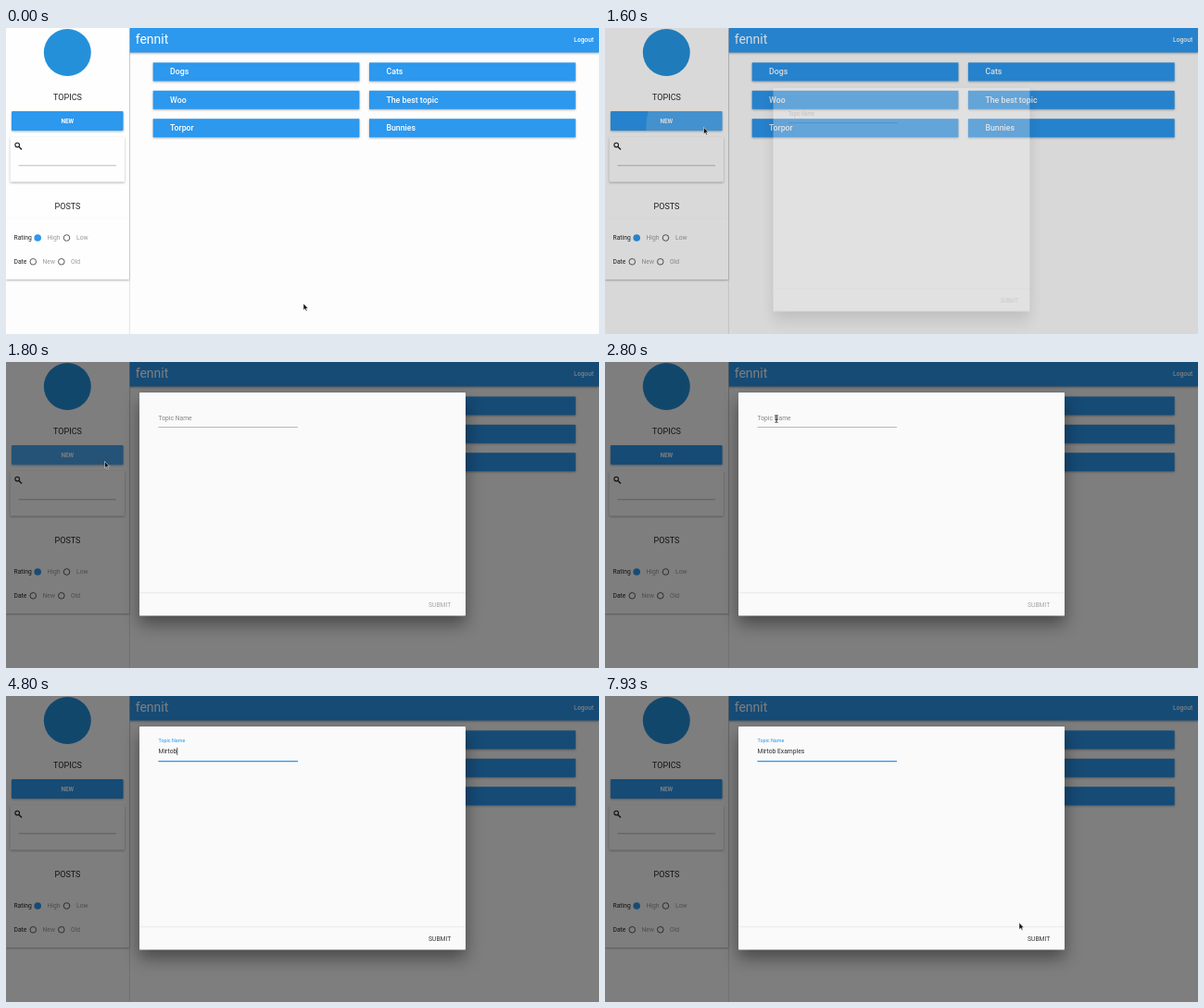
Recreate the animation shown at these times as an HTML page. Size 640 by 331 pixels, loop 8000 ms.

```html
<!DOCTYPE html>
<html lang="en">
<head>
<meta charset="utf-8">
<title>New topic dialog</title>
<style>
  html, body { margin: 0; width: 100%; height: 100%; overflow: hidden; background: #fdfdfd; }
  svg { display: block; width: 100vw; height: 100vh; font: 6.75px Roboto, sans-serif; }
  text { white-space: pre; }
  .blue { fill: #2c98ee; }
  .raised { filter: drop-shadow(0 1px 1.1px rgba(0, 0, 0, .3)); }
  .heading { font-size: 9px; text-anchor: middle; fill: #222; }
  .topic { font-size: 8.8px; font-weight: 500; fill: #fff; }
  .dark { fill: #222; }
  .muted { fill: #9a9a9a; }
  .radio { fill: none; stroke: #5a5a5a; stroke-width: 1; }
  .sheet { fill: #fafafa; filter: drop-shadow(0 9px 9px rgba(0, 0, 0, .42)); }
</style>
</head>
<body>
<svg viewBox="0 0 640 331" preserveAspectRatio="none">
  <defs>
    <clipPath id="buttonClip"><rect x="6" y="90" width="120.5" height="21" rx="1"/></clipPath>
  </defs>

  <rect width="640" height="331" fill="#fdfdfd"/>
  <rect class="blue raised" x="133" width="507" height="26.5"/>
  <text x="139.7" y="17.3" font-size="14" fill="#fff">fennit</text>
  <text x="613" y="15" font-weight="500" fill="#fff">Logout</text>
  <g id="topics"></g>

  <rect width="133" height="331" fill="#fdfdfd"/>
  <path d="M133.4 0V331" stroke="#dcdcdc" stroke-width=".8"/>
  <rect class="raised" width="133" height="272" fill="#fefefe"/>
  <circle cx="66.3" cy="26.5" r="25.5" fill="#2590da"/>
  <text class="heading" x="66.5" y="77.8">TOPICS</text>
  <rect class="blue raised" x="6" y="90" width="120.5" height="21" rx="1"/>
  <text x="66.3" y="102.9" font-size="6.4" font-weight="700" text-anchor="middle" fill="#fff">NEW</text>
  <g clip-path="url(#buttonClip)"><circle id="ripple" cx="106.5" cy="108" fill="#fff"/></g>

  <rect class="raised" x="4.5" y="118" width="123.5" height="48.5" rx="1" fill="#fefefe"/>
  <g fill="none" stroke="#222">
    <circle cx="12.2" cy="126.6" r="2.3" stroke-width="1.1"/>
    <path d="M14 128.4L17 131.4" stroke-width="1.4"/>
  </g>
  <path d="M13.5 148.8H119" stroke="#9e9e9e" stroke-width=".7"/>
  <text class="heading" x="66.5" y="196.2">POSTS</text>
  <path d="M0 206H133" stroke="#f3f3f3" stroke-width=".6"/>

  <text class="dark" x="8.5" y="229.2">Rating</text>
  <circle class="blue" cx="34.2" cy="227" r="3.8"/>
  <text class="muted" x="44.5" y="229.2">High</text>
  <circle class="radio" cx="65.5" cy="227" r="3.3"/>
  <text class="muted" x="76" y="229.2">Low</text>
  <text class="dark" x="8.5" y="255">Date</text>
  <circle class="radio" cx="29.3" cy="252.8" r="3.3"/>
  <text class="muted" x="39.5" y="255">New</text>
  <circle class="radio" cx="59.8" cy="252.8" r="3.3"/>
  <text class="muted" x="70" y="255">Old</text>

  <rect id="overlay" width="640" height="331"/>

  <g id="modal">
    <rect class="sheet" x="144" y="33" width="352" height="241.5" rx=".8"/>
    <path d="M144 249.7H496" stroke="#e2e2e2" stroke-width=".7"/>
    <text id="submit" x="456" y="264.8">SUBMIT</text>
    <path d="M164.5 70.5H315" stroke="#9e9e9e" stroke-width=".7"/>
    <path id="underline" d="M164.5 70.6H315" stroke="#2196f3" stroke-width="1.1"/>
    <text id="label">Topic Name</text>
    <text id="typed" x="164.5" y="62.3" fill="#2b2b2b"></text>
    <rect id="caret" y="55.8" width=".7" height="8" fill="#111"/>
  </g>

  <g id="pointer">
    <path id="arrow" d="M0 0V7.2L1.7 5.7L2.9 8.3L4 7.8L2.9 5.3H5Z" fill="#111" stroke="#fff" stroke-width=".5"/>
    <path id="beam" d="M-1.5 -4Q0 -4 0 -3Q0 -4 1.5 -4M0 -3V3M-1.5 4Q0 4 0 3Q0 4 1.5 4M-1 .9H1" fill="none" stroke="#111" stroke-width=".8"/>
  </g>
</svg>

<script>
const LOOP = 8000;
const CLICK = 1400, OPEN = 1500, OPEN_TIME = 280, FOCUS = 3150;
const MESSAGE = 'Mirtob Examples';
const KEY_TIMES = [3870, 4000, 4130, 4270, 4400, 4530, 5600, 5730,
                   5870, 6000, 6130, 6330, 6400, 6670, 6940];
// time, x, y
const POINTER_STEPS = [
  [0, 321, 298], [300, 321, 298], [1150, 106.5, 107.5], [1950, 106.5, 107.5],
  [2600, 185, 61.5], [7250, 185, 61.5], [7670, 414, 213], [7930, 447, 245.3]
];

const el = Object.fromEntries([...document.querySelectorAll('[id]')].map(e => [e.id, e]));
const clamp = v => Math.min(1, Math.max(0, v));
const progress = (t, start, length) => clamp((t - start) / length);
const swing = p => 0.5 - Math.cos(Math.PI * p) / 2;
const mix = (a, b, p) => a + (b - a) * p;
const set = (e, attrs) => { for (const k in attrs) e.setAttribute(k, attrs[k]); };
const show = (e, on) => set(e, { visibility: on ? 'visible' : 'hidden' });

el.topics.innerHTML = ['Dogs', 'Cats', 'Woo', 'The best topic', 'Torpor', 'Bunnies'].map((name, i) => {
  const x = i % 2 ? 392 : 158.7;
  const y = 37.4 + 30.4 * Math.floor(i / 2);
  return `<rect class="blue raised" x="${x}" y="${y}" width="222.7" height="20"/>
          <text class="topic" x="${x + 18.4}" y="${y + 13}">${name}</text>`;
}).join('');

function drawRipple(t) {
  const fade = 1 - progress(t, 1750, 500);
  set(el.ripple, { r: Math.max(0, Math.min(130, (t - CLICK) * 0.31)), opacity: 0.16 * fade });
}

function drawModal(t) {
  const p = swing(progress(t, OPEN, OPEN_TIME));
  const scale = mix(0.7, 1, p);
  set(el.overlay, { opacity: 0.5 * p });
  set(el.modal, {
    opacity: p,
    transform: `translate(${320 * (1 - scale)} ${45 * (1 - p)}) scale(${scale} 1)`
  });
}

function drawField(t) {
  const focus = swing(progress(t, FOCUS, 200));
  set(el.label, {
    transform: `translate(164.5 ${mix(62.7, 50, focus)}) scale(${mix(1, 0.8, focus)})`,
    fill: focus > 0.5 ? '#2196f3' : '#858585'
  });
  set(el.underline, { opacity: focus });

  const count = KEY_TIMES.filter(k => k <= t).length;
  el.typed.textContent = MESSAGE.slice(0, count);
  set(el.submit, { fill: count ? '#343434' : '#a3a3a3' });

  const sinceKey = t - (count ? KEY_TIMES[count - 1] : FOCUS);
  set(el.caret, { x: 164.7 + (count ? el.typed.getComputedTextLength() : 0) });
  show(el.caret, t >= FOCUS && Math.floor(sinceKey / 500) % 2 === 0);
}

function drawPointer(t) {
  let i = POINTER_STEPS.findIndex(s => s[0] > t);
  if (i < 0) i = POINTER_STEPS.length;
  const from = POINTER_STEPS[i - 1];
  const to = POINTER_STEPS[i] || from;
  const raw = to === from ? 0 : progress(t, from[0], to[0] - from[0]);
  const leaving = from[0] >= 7250;
  const ease = !leaving ? swing(raw) : from[0] < 7600 ? raw * raw : 1 - (1 - raw) ** 2;
  const x = mix(from[1], to[1], ease);
  const y = mix(from[2], to[2], ease);
  const overField = t > OPEN + OPEN_TIME && x > 164 && x < 315 && y > 52 && y < 71;
  const hidden = t >= KEY_TIMES[0] && t < 7250;
  set(el.pointer, { transform: `translate(${x} ${y})` });
  show(el.arrow, !hidden && !overField);
  show(el.beam, !hidden && overField);
}

function frame() {
  const t = performance.now() % LOOP;
  drawRipple(t);
  drawModal(t);
  drawField(t);
  drawPointer(t);
  requestAnimationFrame(frame);
}
frame();
</script>
</body>
</html>
```
